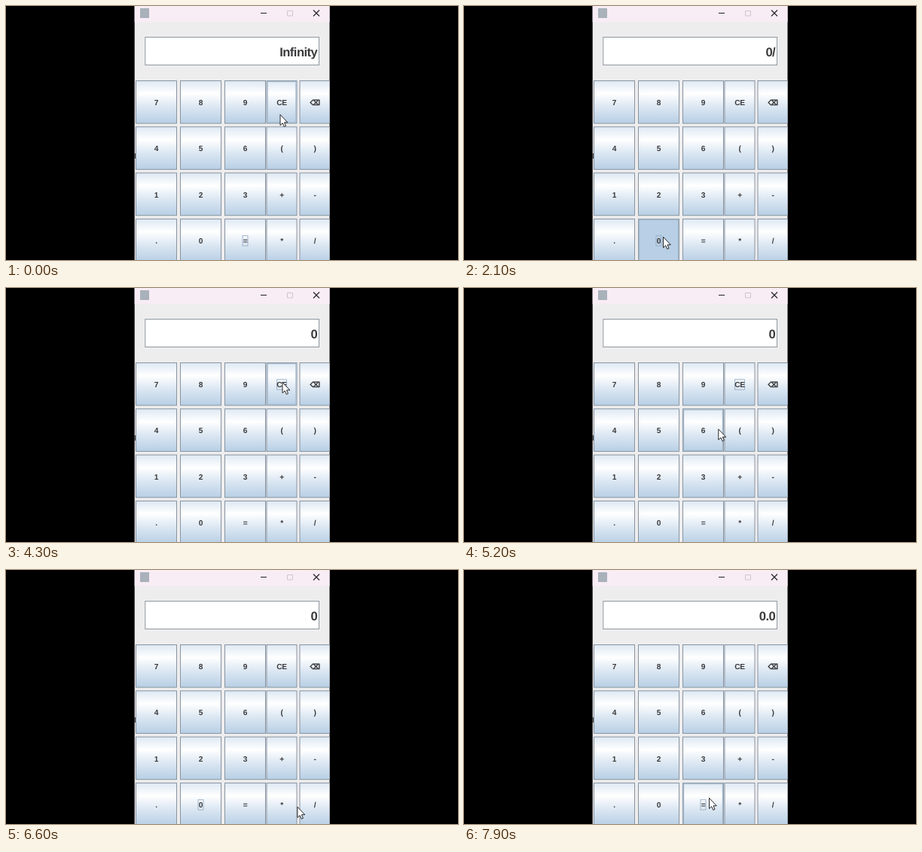
Write an HTML page that moves like this. It is 600 px wide and 338 px high and loops after 8 s.

```html
<!DOCTYPE html>
<html lang="en">
<head>
<meta charset="utf-8">
<title>Calculator</title>
<style>
html, body { margin: 0; width: 100%; height: 100%; overflow: hidden; background: #000; }
svg { display: block; width: 100vw; height: 100vh; }
text {
  font-family: "Liberation Sans", Arial, "DejaVu Sans", sans-serif;
  font-weight: bold; fill: #3a3a3c; text-rendering: geometricPrecision;
}
.label { font-size: 10.2px; letter-spacing: -.4px; text-anchor: middle; }
.erase { font-size: 9.5px; stroke: #3a3a3c; stroke-width: .5; }
.face { fill: url(#face); stroke: #8894a1; }
.glow { fill: none; stroke: #a3b8cc; stroke-width: 1.4; visibility: hidden; }
.focus { fill: none; stroke: #91a8c0; stroke-width: .8; visibility: hidden; }
.hover .glow, .focused .focus { visibility: visible; }
.pressed .face { fill: #b8cfe5; }
#display { font-size: 16.6px; letter-spacing: -.55px; text-anchor: end; }
</style>
</head>
<body>
<svg viewBox="0 0 600 338" preserveAspectRatio="none">
  <defs>
    <linearGradient id="face" x2="0" y2="1">
      <stop offset="0" stop-color="#dde8f3"/>
      <stop offset=".3" stop-color="#fff"/>
      <stop offset=".6" stop-color="#dde8f3"/>
      <stop offset="1" stop-color="#b8cfe5"/>
    </linearGradient>
    <clipPath id="window"><rect x="170.7" width="258.8" height="338"/></clipPath>
  </defs>
  <rect width="600" height="338"/>
  <g clip-path="url(#window)">
    <rect x="170" width="260" height="338" fill="#eeedee"/>
    <rect x="170" width="260" height="21.5" fill="#f8ecf5"/>
    <rect x="170" y="196" width="2" height="7" fill="#444"/>
    <rect x="178" y="3" width="12" height="13" fill="#a9b1ba"/>
    <g fill="none" stroke="#222">
      <path d="M338 9.5h8"/>
      <path d="M373.5 6.5h7v6.5h-7z" stroke="#cfc5cd"/>
      <path d="M408 5.5l8 8m0-8l-8 8" stroke-width="1.1"/>
    </g>
    <rect x="184.8" y="41.5" width="230.7" height="37" fill="#fff" stroke="#8f979e"/>
    <text id="display" x="413.2" y="67"></text>
    <g id="keys"></g>
  </g>
  <path id="pointer" d="M0 0V14.2L3.2 11.3L5.3 16L7.5 15L5.5 10.4H9.8Z" fill="#fff" stroke="#111" stroke-width=".9" stroke-linejoin="round"/>
</svg>
<script>
const NS = 'http://www.w3.org/2000/svg';
const LOOP = 8000, STEP = 100, MAX_TRAVEL = 1300;
const rows = ['7 8 9 CE ⌫', '4 5 6 ( )', '1 2 3 + -', '. 0 = * /'];

// press time, key, pointer offset from the key's centre
const visits = [
  [200, 'CE', -2, 16], [900, '0', 6, -9], [1500, '/', -2, 0],
  [2100, '0', 6, -5], [2600, '=', 4, -4], [3500, 'display', 0, 0],
  [4200, 'CE', 1, -3], [6100, '0', 20, 2], [6800, '/', -3, 3],
  [7400, '3', 5, 6], [7800, '=', 8, -9]
];

const display = document.getElementById('display');
const pointer = document.getElementById('pointer');
const board = document.getElementById('keys');

function add(parent, tag, attrs) {
  const el = document.createElementNS(NS, tag);
  for (const name in attrs) el.setAttribute(name, attrs[name]);
  return parent.appendChild(el);
}

function box(parent, cls, x, y, width, height) {
  add(parent, 'rect', { class: cls, x, y, width, height });
}

function makeKey(name, row, col) {
  const digit = col < 3;
  const x = digit ? 172.5 + 59 * col : 346 + 44 * (col - 3);
  const y = 99.5 + 61.3 * row;
  const w = digit ? 54 : 40, h = 56.6, cx = x + w / 2, cy = y + 29;
  const g = add(board, 'g', {});
  box(g, 'face', x, y, w, h);
  box(g, 'glow', x + 1, y + 1, w - 2, h - 2);
  const fw = 1 + 6 * name.length;
  box(g, 'focus', cx - fw / 2, cy - 6.7, fw, 13.4);
  const cls = name === '⌫' ? 'label erase' : 'label';
  add(g, 'text', { class: cls, x: cx, y: cy + 3.5 }).textContent = name;
  return { name, g, x, y, w, h, cx, cy };
}

const keys = rows.flatMap((line, r) => line.split(' ').map((name, c) => makeKey(name, r, c)));
const places = Object.fromEntries(keys.map(k => [k.name, k]));
places.display = { cx: 390, cy: 63 };

function spot([, name, dx, dy]) {
  return [places[name].cx + dx, places[name].cy + dy];
}

// The pointer arrives one step before a press and leaves two steps after it.
function pointerAt(t) {
  let [x, y] = spot(visits[0]);
  for (let i = 1; i < visits.length; i++) {
    const arrive = visits[i][0] - STEP;
    const leave = Math.max(visits[i - 1][0] + 2 * STEP, arrive - MAX_TRAVEL);
    if (t <= leave) break;
    const u = Math.min(1, (t - leave) / (arrive - leave));
    const e = u * u * (3 - 2 * u);
    const [nx, ny] = spot(visits[i]);
    x += (nx - x) * e;
    y += (ny - y) * e;
  }
  return [x, y];
}

function enter(text, key) {
  if (key === 'CE') return '0';
  if (key === '=') {
    const [a, b] = text.split('/');
    const value = a / b;
    return Number.isInteger(value) ? value.toFixed(1) : String(value);
  }
  return text === '0' && key !== '/' ? key : text + key;
}

function draw(t) {
  let text = 'Infinity', focus = '=', pressed = '';
  for (const [down, key] of visits) {
    if (t < down) break;
    if (key === 'display') continue;
    focus = key;
    if (t < down + STEP) pressed = key;
    else text = enter(text, key);
  }
  const [px, py] = pointerAt(t);
  for (const k of keys) {
    const over = px >= k.x && px <= k.x + k.w && py >= k.y && py <= k.y + k.h;
    k.g.classList.toggle('hover', over);
    k.g.classList.toggle('focused', k.name === focus);
    k.g.classList.toggle('pressed', k.name === pressed);
  }
  display.textContent = text;
  pointer.setAttribute('transform', `translate(${px} ${py})`);
}

const start = performance.now();
function tick() {
  const t = (performance.now() - start) % LOOP;
  draw(Math.floor(t / STEP) * STEP);
  requestAnimationFrame(tick);
}
tick();
</script>
</body>
</html>
```
